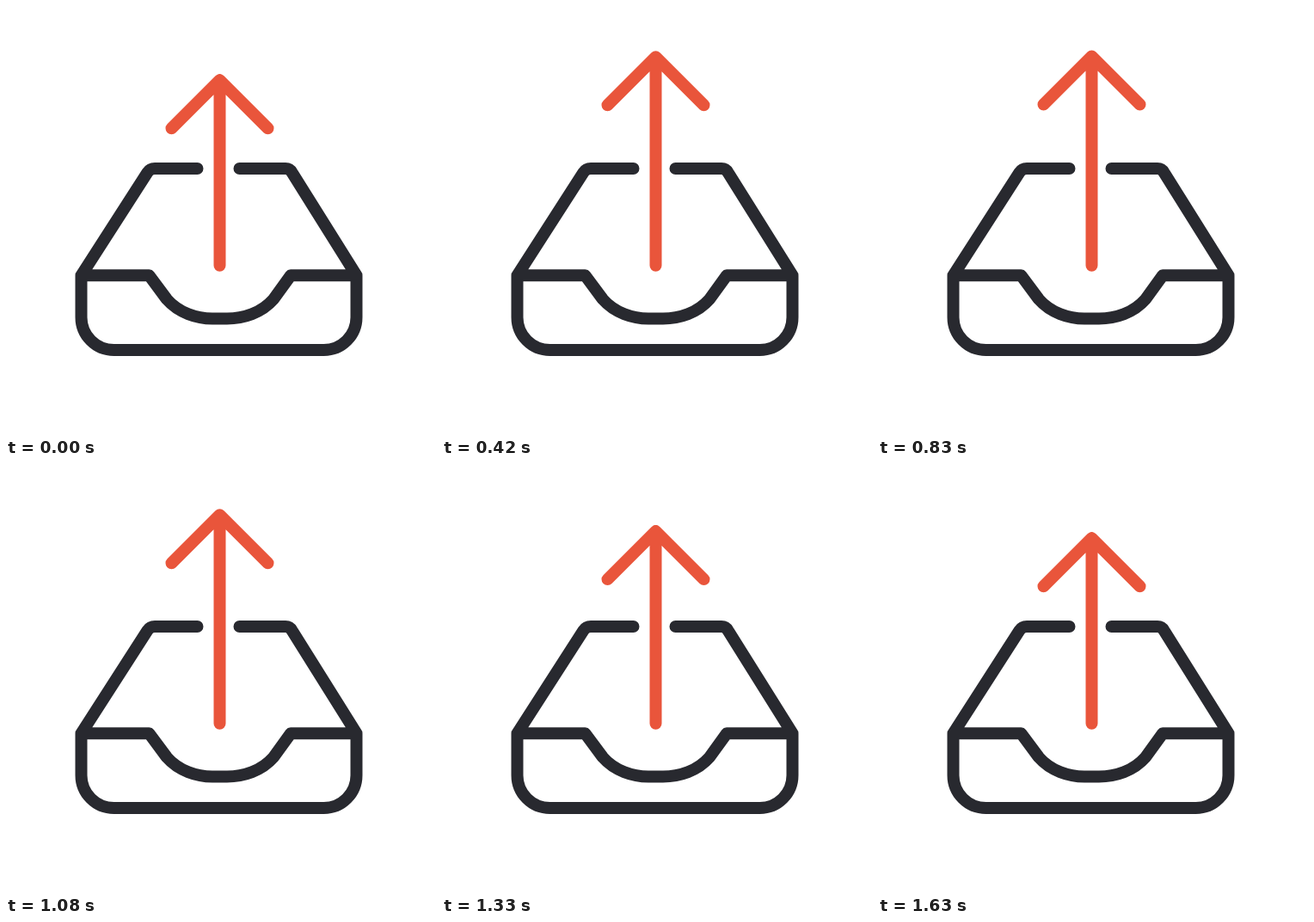
Animation of 500 by 500 pixels, one loop 1680 ms. Source, as an HTML page with a canvas:

```html
<!DOCTYPE html>
<html lang="en">
<head>
<meta charset="utf-8">
<title>Outbox</title>
<style>
html, body { margin: 0; width: 100%; height: 100%; overflow: hidden; background: #fff; }
canvas { display: block; width: 500px; height: 500px; }
</style>
</head>
<body>
<canvas id="stage" width="500" height="500"></canvas>
<script>
const ctx = document.getElementById('stage').getContext('2d');
const LOOP = 1680, FPS = 24, LAST = 39;
const DARK = '#28292f', ORANGE = '#e9553b';

// Vertical offset of the arrow head: [tick, offset]
const keys = [
  [0, 0], [2, 10], [5.2, -36], [10, -27],
  [16, -10], [22.4, -36], [26, -27],
  [28, -36], [35, 10], [39, 0]
];

const tray = new Path2D(
  'M87.5 313.3V362A38 38 0 0 0 125.5 400H369.5A38 38 0 0 0 407.5 362V313.3' +
  'M87.5 313.3H166.5L187 341C201 357 222 363.5 240 363.5H257' +
  'C276 363.5 297 357 311 341L331 313.3H407.5' +
  'M87.5 313.3L164.5 193.5Q167.5 189 173 189H222.5' +
  'M271.5 189H325Q330 189 332.5 193.5L407.5 313.3'
);

const ease = u => u * u * (3 - 2 * u);

function headOffset(tick) {
  const i = Math.max(1, keys.findIndex(k => k[0] >= tick));
  const [t0, y0] = keys[i - 1], [t1, y1] = keys[i];
  return y0 + (y1 - y0) * ease((tick - t0) / (t1 - t0));
}

function arrow(offset) {
  const x = 248.5, tip = 86.2 + offset, wing = 56;
  const path = new Path2D();
  path.moveTo(x, 301.7);
  path.lineTo(x, tip);
  path.moveTo(x - wing, tip + wing);
  path.lineTo(x, tip);
  path.lineTo(x + wing, tip + wing);
  return path;
}

function stroke(path, color) {
  ctx.strokeStyle = color;
  ctx.stroke(path);
}

function draw(now) {
  const tick = Math.min(LAST, Math.floor((now % LOOP + 5) * FPS / 1000));
  ctx.fillStyle = '#fff';
  ctx.fillRect(0, 0, 500, 500);
  ctx.lineWidth = 14;
  ctx.lineCap = ctx.lineJoin = 'round';
  stroke(tray, DARK);
  stroke(arrow(headOffset(tick)), ORANGE);
}

const start = performance.now();
function loop() {
  draw(performance.now() - start);
  requestAnimationFrame(loop);
}
loop();
</script>
</body>
</html>
```
